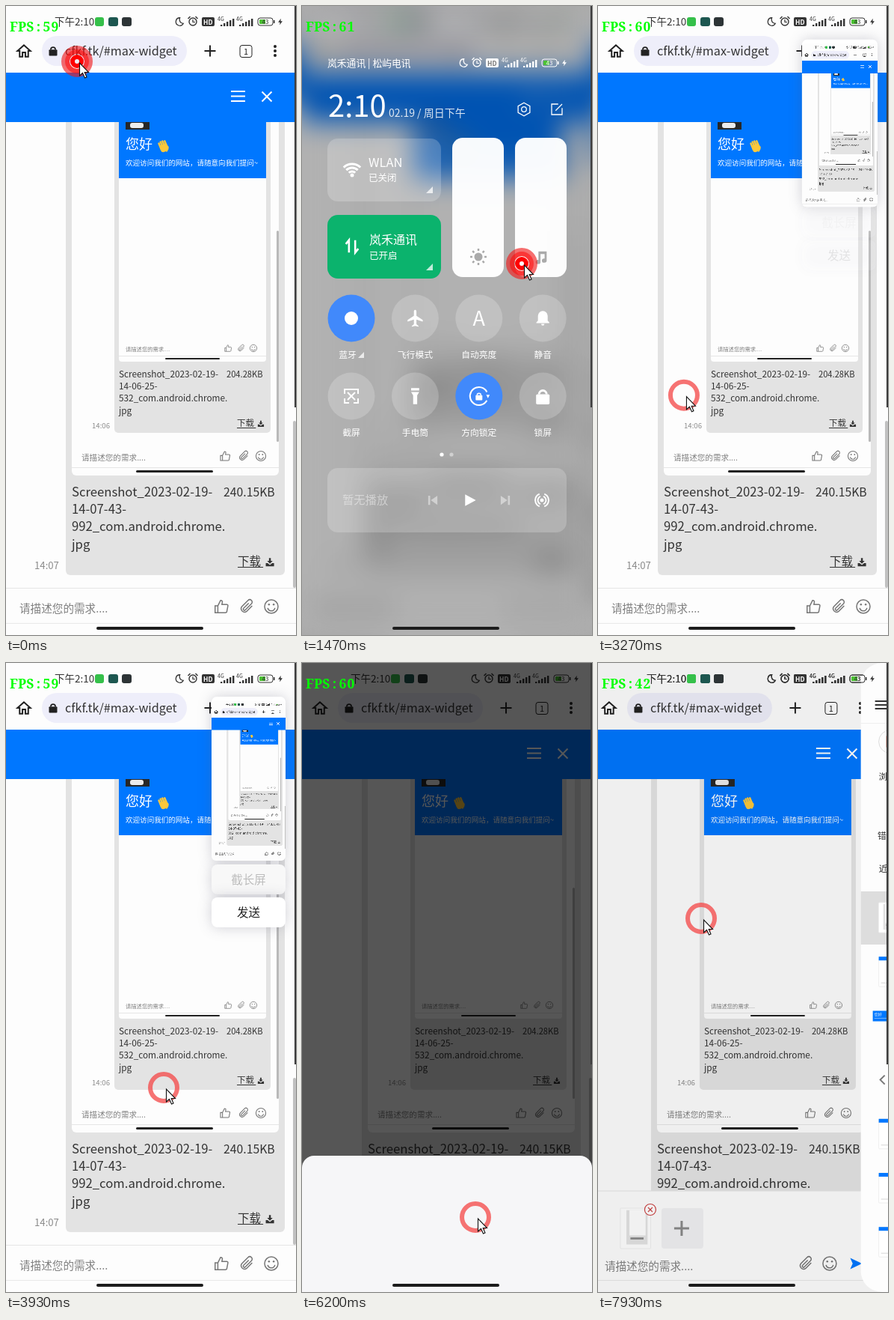
Animation of 388x840 px, one loop 8 s. Source, as an HTML page with a canvas:

```html
<!DOCTYPE html>
<html lang="zh">
<head>
<meta charset="utf-8">
<style>
html, body { margin: 0; width: 388px; height: 840px; overflow: hidden; background: #fff; }
canvas { display: block; }
</style>
</head>
<body>
<canvas id="stage" width="388" height="840"></canvas>
<script>
const W = 388, H = 840, LOOP = 8000;
const FONT = '"Noto Sans CJK SC", "Noto Sans CJK JP", Roboto, sans-serif';
const BLUE = '#0077ff', GREY = '#e3e3e3', INK = '#333';
const stage = document.getElementById('stage').getContext('2d');
let c = stage;

const PATHS = {
  home: 'M12 4L3 12H6V20H10V14H14V20H18V12H21Z',
  thumb: 'M3 11H7V21H3ZM7 11L11 3C13 3 14 4 13.5 6L13 9H20C21 9 22 10 21.7 11L20 20C19.8 20.6 19 21 18 21H7',
  clip: 'M20 11L12 19A5 5 0 0 1 5 12L14 3A3.5 3.5 0 0 1 19 8L10 17A1.7 1.7 0 0 1 7.5 14.5L15 7',
  download: 'M10 3H14V9H18L12 15L6 9H10ZM3 14H7L12 18L17 14H21V21H3Z',
  plane: 'M12 2C13 2 13.5 3 13.5 4V9L21 14V16L13.5 13.5V19L16 21V22L12 21L8 22V21L10.5 19V13.5L3 16V14L10.5 9V4C10.5 3 11 2 12 2Z',
  bell: 'M12 3A6 6 0 0 1 18 9V15L20 17V18H4V17L6 15V9A6 6 0 0 1 12 3ZM10 19H14A2 2 0 0 1 10 19Z',
  moon: 'M13 3A9 9 0 1 0 21 16A9 9 0 0 1 13 3Z',
  bolt: 'M14 2L5 14H11L10 22L19 10H13Z',
  send: 'M3 3L22 12L3 21L7 12Z',
  corner: 'M3 3H10L7.5 5.5L11 9L9 11L5.5 7.5L3 10Z',
  note: 'M8 4H20V17A3.5 3 0 1 1 17 14.5V8H11V19A3.5 3 0 1 1 8 16.5Z',
  play: 'M6 4L21 12L6 20Z',
  skip: 'M5 5L15 12L5 19ZM16 5H19V19H16Z',
  torch: 'M7 2H17V5H7ZM7 7H17L14.5 11V22H9.5V11Z',
  hexagon: 'M12 2L21 7V17L12 22L3 17V7Z',
  edit: 'M14 4H4V20H20V10M10 14L20 4',
  doc: 'M5 2H14L20 8V22H5Z',
  arrows: 'M8 20V4L4 9M16 4V20L20 15',
  pointer: 'M0 0V17L4 13.5L7 20L9.5 19L6.7 12.5H12Z'
};
for (const k in PATHS) PATHS[k] = new Path2D(PATHS[k]);

function box(x, y, w, h, r, fill, stroke) {
  c.beginPath();
  c.roundRect(x, y, w, h, r);
  if (fill) { c.fillStyle = fill; c.fill(); }
  if (stroke) { c.strokeStyle = stroke; c.lineWidth = 1; c.stroke(); }
}
function disc(x, y, r, fill) {
  c.beginPath();
  c.arc(x, y, r, 0, 7);
  c.fillStyle = fill;
  c.fill();
}
function arc(x, y, r, color, w = 1, from = 0, to = Math.PI * 2) {
  c.beginPath();
  c.arc(x, y, r, from, to);
  c.strokeStyle = color;
  c.lineWidth = w;
  c.stroke();
}
function line(color, w, ...p) {
  c.beginPath();
  for (let i = 0; i < p.length; i += 2) c.lineTo(p[i], p[i + 1]);
  c.strokeStyle = color;
  c.lineWidth = w;
  c.stroke();
}
function text(s, x, y, size, color = INK, weight = 400, align = 'left') {
  c.font = `${weight} ${size}px ${FONT}`;
  c.textAlign = align;
  c.fillStyle = color;
  c.fillText(s, x, y);
}
// Icons live on a 24-unit grid; a line width means outline instead of fill.
function icon(name, x, y, size, color, lineWidth, turn = 0) {
  c.save();
  c.translate(x, y);
  c.rotate(turn);
  c.scale(size / 24, size / 24);
  c.translate(-12, -12);
  if (lineWidth) {
    c.strokeStyle = color;
    c.lineWidth = lineWidth * 24 / size;
    c.stroke(PATHS[name]);
  } else {
    c.fillStyle = color;
    c.fill(PATHS[name]);
  }
  c.restore();
}
const menu = (x, y, w, gap, color) =>
  [-gap, 0, gap].forEach(d => line(color, 2, x, y + d, x + w, y + d));
const cross = (x, y, r, color, w) => {
  line(color, w, x - r, y - r, x + r, y + r);
  line(color, w, x - r, y + r, x + r, y - r);
};
const plus = (x, y, r, color, w) => {
  line(color, w, x - r, y, x + r, y);
  line(color, w, x, y - r, x, y + r);
};
function smile(x, y, r, color) {
  const w = Math.max(.8, r / 6);
  arc(x, y, r, color, w);
  arc(x, y + r * .1, r * .55, color, w, .2, 2.94);
  disc(x - r * .35, y - r * .3, r * .14, color);
  disc(x + r * .35, y - r * .3, r * .14, color);
}
function padlock(x, y, s, color) {
  box(x - s * .5, y - s * .25, s, s * .75, s * .1, color);
  arc(x, y - s * .25, s * .28, color, s * .16, Math.PI, 0);
}
function longShot(x, y, s) {
  box(x, y, 30 * s, 40 * s, 1, '#fff', '#eeeeee');
  box(x + 6 * s, y + 2 * s, 21 * s, 34 * s, 0, GREY);
  box(x + 9 * s, y + 2 * s, 16 * s, 25 * s, 0, '#fff');
  box(x + 10 * s, y + 29 * s, 13 * s, 2 * s, 0, '#888');
}

function statusIcons(x, y, color) {
  icon('moon', x, y, 14, color, 1.3);
  arc(x + 18, y, 5, color, 1.4);
  line(color, 1.2, x + 18, y - 3, x + 18, y + .5, x + 21, y + .5);
  line(color, 1.4, x + 11.5, y - 4, x + 14.5, y - 7);
  line(color, 1.4, x + 24.5, y - 4, x + 21.5, y - 7);
  box(x + 30, y - 6, 17, 12, 2, color);
  text('HD', x + 32, y + 3.5, 8.5, color === '#fff' ? '#777' : '#fff', 700);
  for (const sx of [x + 51, x + 76]) {
    text('4G', sx, y - 1, 7, color, 500);
    for (let i = 0; i < 5; i++) box(sx + 4 + i * 4, y + 4 - i * 2, 2.4, 2 + i * 2, 0, color);
  }
  box(x + 105, y - 5, 20, 10, 3, null, color);
  box(x + 107, y - 3, 8, 6, 1, '#4bc233');
  text('43', x + 115, y + 3, 8, color, 500, 'center');
  box(x + 126, y - 2, 1.5, 4, 0, color);
  icon('bolt', x + 135, y, 10, color);
}
function statusBar() {
  text('下午2:10', 65, 26, 13.5);
  box(119, 15, 12, 12, 3, '#35c04a');
  box(137, 15, 13, 12, 3, '#1d5750');
  box(155, 15, 13, 12, 3, '#2d3436');
  statusIcons(232, 21, INK);
}

function composer(y, scale, textX, size, iconXs) {
  text('请描述您的需求....', textX, y + size * .58, size, '#808080');
  icon('thumb', iconXs[0], y, 22 * scale, '#777', 1.5 * scale);
  icon('clip', iconXs[1], y, 22 * scale, '#777', 1.5 * scale);
  smile(iconXs[2], y, 9 * scale, '#777');
}
function fileLabel(x, y, step, size, lines, sizeX, weight) {
  lines.forEach((s, i) => text(s, x, y + i * step, size));
  text(weight, sizeX, y, size * .945);
}
function download(x, y, size) {
  text('下载', x, y, size);
  line(INK, 1, x, y + 2.5, x + size * 2.2, y + 2.5);
  icon('download', x + size * 2.78, y - size * .27, size * .95, INK);
}
function hand(x, y) {
  c.save();
  c.translate(x, y);
  c.rotate(-.4);
  box(-5, -2, 11, 10, 4, '#fcc83c');
  for (let i = 0; i < 4; i++) box(-5 + i * 2.8, -8 + Math.abs(i - 1.5), 2.5, 10, 1.2, '#fcc83c');
  c.rotate(.7);
  box(5, -2, 2.8, 8, 1.4, '#fcc83c');
  c.restore();
}

function page(attached) {
  box(-100, 0, W + 200, H, 0, '#fdfdfd');
  icon('home', 24, 60, 23, '#222', 2);
  box(48, 40, 194, 40, 20, '#eeeefa');
  padlock(63, 61, 11, '#222');
  text('cfkf.tk/#max-widget', 79, 66, 16.2, INK);
  plus(273, 60, 7.5, '#222', 2);
  box(313, 52.5, 16, 16, 3, null, '#222');
  text('1', 321, 65, 11, '#222', 500, 'center');
  [-6, 0, 6].forEach(d => disc(360, 60 + d, 2, '#222'));

  box(80, 150, 293, 610, 6, GREY);
  box(88, 150, 277, 477, 6, '#fdfdfd');
  box(145, 150, 209, 420, 5, GREY);
  box(151, 150, 197, 325, 4, '#fdfdfd');
  box(151, 150, 197, 80, 0, BLUE);
  box(160, 150, 32, 15, 0, '#272727');
  box(166, 156, 18, 7, 3, '#ececec');
  text('您好', 160, 191, 18, '#fff');
  hand(210, 187);
  text('欢迎访问我们的网站，请随意向我们提问~', 160, 213, 9.55, '#fff');
  composer(457, .52, 160, 7.3, [297, 314.5, 331]);
  line('#e6e6e6', 1, 151, 467.5, 348, 467.5);
  box(213, 470, 73, 2, 1, '#222');
  fileLabel(151, 495.5, 16.4, 11.8,
    ['Screenshot_2023-02-19-', '14-06-25-', '532_com.android.chrome.', 'jpg'], 295, '204.28KB');
  text('14:06', 115, 564, 9.6, '#8a8a8a');
  download(309, 561, 11.5);
  box(362, 300, 3, 282, 1.5, '#b9b9b9');
  composer(601, .73, 101, 10.6, [293, 318, 341]);
  line('#e6e6e6', 1, 88, 616.5, 365, 616.5);
  box(174, 620, 103, 3, 1.5, '#222');
  fileLabel(88, 655, 23.2, 16.7,
    ['Screenshot_2023-02-19-', '14-07-43-', '992_com.android.chrome.', 'jpg'], 291, '240.15KB');
  text('14:07', 38, 752, 13.2, '#8a8a8a');
  download(310, 747, 15.5);
  box(384, 554, 4, 223, 2, '#c1c1c1');

  box(-100, 89, W + 198, 66, 0, BLUE);
  menu(301, 120.5, 19, 6.5, '#fff');
  cross(349, 121, 6.5, '#fff', 2);

  if (attached) {
    box(-100, 705, W + 200, 135, 0, '#fdfdfd');
    line('#e4e4e4', 1, 0, 705, W + 100, 705);
    longShot(39, 728, 1.35);
    disc(79, 730, 8, '#fff');
    arc(79, 730, 7.5, '#c44', 1.2);
    cross(79, 730, 3, '#c44', 1.2);
    box(94, 728, 56, 54, 4, '#f0f0f2');
    plus(121, 755, 10, '#888', 3);
    text('请描述您的需求....', 18, 811, 14.6, '#808080');
    icon('clip', 287, 802, 22, '#777', 1.5);
    smile(319, 802, 9, '#777');
    icon('send', 354, 802, 20, BLUE);
  } else {
    box(0, 777, W, 63, 0, '#fdfdfd');
    line('#e6e6e6', 1, 0, 777.5, W, 777.5);
    composer(802, 1, 18, 14.6, [288, 322, 355]);
  }
  line('#e8e8e8', 1, 0, 824.5, W + 100, 824.5);
}

function controlCenter(k) {
  const away = 1 - k;
  // Each tile shrinks about its own centre while the whole panel lifts.
  const tile = (x, y, draw) => {
    c.save();
    c.translate(x, y - 22 * away);
    c.scale(1 - .1 * away, 1 - .1 * away);
    c.translate(-x, -y);
    draw();
    c.restore();
  };
  const pale = 'rgba(255,255,255,.2)', dim = 'rgba(255,255,255,.45)', white = '#fff';
  const corner = (x, y, s = 9) => {
    c.beginPath();
    c.moveTo(x, y); c.lineTo(x - s, y); c.lineTo(x, y - s);
    c.fillStyle = 'rgba(255,255,255,.75)';
    c.fill();
  };
  c.save();
  c.globalAlpha = k;
  tile(194, 76, () => {
    text('岚禾通讯 | 松屿电讯', 34, 81, 12.8, white, 500);
    statusIcons(216, 76, white);
  });
  tile(72, 131, () => text('2:10', 35, 148, 40, white, 200));
  tile(170, 142, () => text('02.19 / 周日下午', 116, 148, 14, 'rgba(255,255,255,.85)', 300));
  tile(319, 138, () => {
    icon('hexagon', 297, 138, 21, white, 1.3);
    arc(297, 138, 3.3, white, 1.3);
    icon('edit', 341, 138, 21, white, 1.3);
  });
  tile(110, 219, () => {
    box(34, 177, 152, 84, 14, pale);
    [6, 11, 16].forEach(r => arc(67, 227, r, white, 3, -2.35, -.8));
    disc(67, 226, 2.5, white);
    text('WLAN', 89, 215, 16.5, white, 500);
    text('已关闭', 89, 234, 12.5, white);
    corner(175, 250);
  });
  tile(110, 321, () => {
    box(34, 279, 152, 85, 14, '#0bb36d');
    icon('arrows', 67, 321, 25, white, 2.6);
    text('岚禾通讯', 90, 318, 16, white, 500);
    text('已开启', 90, 338, 12.5, white);
    corner(175, 353);
  });
  [235.5, 319.5].forEach((x, i) => tile(x, 269, () => {
    box(x - 34.5, 176, 69, 186, 14, 'rgba(255,255,255,.97)');
    if (i) return icon('note', 320, 335, 22, '#aaa');
    disc(236, 335, 5.5, '#aaa');
    for (let a = 0; a < 6.2; a += Math.PI / 4)
      line('#aaa', 2.5, 236 + 8 * Math.cos(a), 335 + 8 * Math.sin(a), 236 + 11 * Math.cos(a), 335 + 11 * Math.sin(a));
  }));
  ['蓝牙', '飞行模式', '自动亮度', '静音', '截屏', '手电筒', '方向锁定', '锁屏'].forEach((label, i) => {
    const x = 66 + (i % 4) * 85.4, y = i < 4 ? 417 : 521;
    tile(x, y, () => {
      disc(x, y, 31.5, i === 0 || i === 6 ? '#4189fb' : pale);
      text(label, i ? x : x - 5, y + 53, 11.8, white, 400, 'center');
      [
        () => { disc(x, y, 9, white); corner(x + 17, y + 53, 8); },
        () => icon('plane', x, y, 27, white),
        () => text('A', x, y + 10, 27, white, 400, 'center'),
        () => icon('bell', x, y, 26, white),
        () => {
          [[-1, -1], [1, -1], [-1, 1], [1, 1]].forEach(([u, v]) =>
            line(white, 2, x + u * 9, y + v * 3, x + u * 9, y + v * 9, x + u * 3, y + v * 9));
          line(white, 2, x - 9, y - 9, x + 9, y - 9);
          cross(x, y, 5, white, 2);
        },
        () => icon('torch', x, y, 26, white),
        () => { arc(x, y, 12, white, 2, .5, 5.8); padlock(x, y + 1, 9, white); icon('play', x + 12, y, 7, white, 0, 1.57); },
        () => padlock(x, y + 2, 18, white)
      ][i]();
    });
  });
  disc(187, 599, 2.6, white);
  disc(200, 599, 2.6, dim);
  tile(194, 660, () => {
    box(34, 617, 320, 86, 14, pale);
    text('暂无播放', 54, 665, 15.3, dim);
    icon('skip', 175, 660, 21, dim, 0, Math.PI);
    icon('play', 224, 660, 23, white);
    icon('skip', 272, 660, 21, dim);
    disc(321, 660, 2.5, white);
    for (const r of [5.5, 9]) {
      arc(321, 660, r, white, 2, -1.2, 1.2);
      arc(321, 660, r, white, 2, 1.94, 4.34);
    }
  });
  c.restore();
}

const FILES = [
  ['Screenshot_2023-02-19-14-1...', '下午2:10, 267 kB, JPG 图片'],
  ['Screenshot_2023-02-19-14-0...', '下午2:07, 246 kB, JPG 图片'],
  ['Screenshot_2023-02-19-14-0...', '下午2:06, 209 kB, JPG 图片'],
  ['index.html', '上午5:36, 12.70 kB, HTML 文档'],
  ['e4d977cc-e0f1-4b85-870a-5...', '上午5:18, 2.79 MB, GIF 图片'],
  ['20230219_051513.gif', '上午5:15, 26.67 MB, GIF 图片'],
  ['Video_20230219_051137_606...', '上午5:12, 16.77 MB, GIF 图片']
];
function picker(selected) {
  const dark = '#555';
  box(0, 0, W, H, 28, '#fdfdfd');
  if (selected) box(0, 305, W, 71, 0, '#dddddd');
  c.translate(-2, 0);
  menu(21, 56, 17, 5, INK);
  text('最近', 74, 63, 19, '#222', 500);
  arc(316, 54, 6, dark, 2.2);
  line(dark, 2.4, 320, 58, 327, 65);
  [-6, 0, 6].forEach(d => disc(364, 56 + d, 2, dark));
  line('#efefef', 1, 0, 80.5, W, 80.5);

  ['图片', '音频', '视频', '文档', ''].forEach((s, i) => {
    const x = 26 + i * 86.5;
    box(x, 89.5, 78.5, 31, 15.5, null, '#dcdcdc');
    text(s, x + 39, 109.5, 13.8, INK, 500);
    if (i > 2) return icon('doc', x + 19, 105, 20, '#666');
    box(x + 10, 96, 18, 18, 2, '#e8503a');
    if (i === 0) line('#fff', 2.5, 39, 110, 42.5, 105.5, 45, 108.5, 48, 104.5, 51, 110, 39, 110);
    if (i === 1) { arc(x + 19, 105, 5, '#fff', 2, Math.PI, 0); box(x + 13, 105, 4, 6, 1, '#fff'); box(x + 21, 105, 4, 6, 1, '#fff'); }
    if (i === 2) [12, 18, 24].forEach(d => line('#fff', 1.6, x + d, 96, x + d + 3, 101));
  });

  text('浏览其他应用中的文件', 26, 156, 10.9, '#222', 500);
  ['错误报告', '本地视频', '录音机', '系统跟踪记录'].forEach((s, i) =>
    text(s, 48 + i * 93, 235, 11.8, INK, 400, 'center'));
  box(42, 189, 12, 19, 6, null, dark);
  box(43, 190, 10, 17, 5, null, dark);
  [192, 198, 204].forEach(y => { line(dark, 2, 37, y, 42, y); line(dark, 2, 54, y, 59, y); });
  [196, 201].forEach(y => line(dark, 2, 45, y, 51, y));
  line(dark, 2, 43, 186, 46, 190); line(dark, 2, 53, 186, 50, 190);
  box(127, 183, 29, 29, 6, '#24a3ea');
  disc(234, 198, 11, '#e85545');
  disc(327, 198, 9, '#a4c52c');

  text('近期的文件', 26, 279, 11.7, '#222', 500);
  for (let i = 0; i < 6; i++) box(335.5 + (i % 3) * 5.3, i < 3 ? 269.5 : 275, 5, 5, 0, null, dark);

  FILES.forEach(([name, info], i) => {
    const y = 340 + i * 72.2;
    text(name, 73, y - 4, 16, '#2b2b2b');
    text(info, 73, y + 17, 11.5, '#707070');
    line('#dedede', 1, 73, y + 36.5, 382, y + 36.5);
    for (let q = 0; q < 4; q++) icon('corner', 354, y, 29, '#444', 0, q * Math.PI / 2);
    if (i === 0) longShot(26, y - 20, 1);
    else if (i === 2) {
      box(18, y - 20, 39, 14, 0, BLUE);
      text('您好', 20, y - 13, 5, '#fff');
      line('#9cc9ff', .8, 20, y - 10, 45, y - 10);
    } else if (i === 3) {
      line('#777', 2, 34, y - 6, 28, y, 34, y + 6);
      line('#777', 2, 40, y - 6, 46, y, 40, y + 6);
    } else {
      box(26, y - 20, 30, 40, 1, '#fff', '#eeeeee');
      box(26, y - 20, 30, 5, 0, BLUE);
      line('#d5d5d5', 1, 29, y + 15, 53, y + 15);
    }
  });
  text('mmexport1676733696326.png', 73, 842, 16, '#d5d5d5');
}

// Piecewise interpolation over [time, value...] rows.
function track(rows, t, smooth) {
  if (t <= rows[0][0]) return rows[0].slice(1);
  for (let i = 1; i < rows.length; i++) {
    const a = rows[i - 1], b = rows[i];
    if (t < b[0]) {
      let u = (t - a[0]) / (b[0] - a[0]);
      if (smooth) u = u * u * (3 - 2 * u);
      return a.slice(1).map((v, j) => v + (b[j + 1] - v) * u);
    }
  }
  return rows[rows.length - 1].slice(1);
}
const easeOut = u => 1 - (1 - Math.min(1, Math.max(0, u))) ** 3;

const CURSOR = [
  [60, 95, 74], [330, 254, 139], [470, 254, 139], [850, 267, 11], [1070, 267, 11], [1420, 294, 344],
  [1700, 294, 344], [2250, 70, 504], [2800, 70, 504], [3500, 130, 525], [3930, 211, 567],
  [4700, 324, 802], [5300, 324, 802], [5900, 232, 740], [6250, 232, 740], [6850, 135, 222],
  [7130, 135, 222], [7330, 138, 341]
];
const PRESSES = [[0, 65], [870, 1620], [2300, 2690], [4750, 5060], [6000, 6200], [7350, 7520]];
const FPS = [59, 61, 60, 60, 59, 60, 60, 59, 42];

function pointer(t) {
  const [x, y] = track(CURSOR, t, true);
  if (PRESSES.some(([a, b]) => t >= a && t < b)) {
    // The gap and the centre stay open, so the screen shows through.
    arc(x, y, 15.5, 'rgba(240,25,25,.62)', 11);
    arc(x, y, 13, 'rgba(255,0,0,.5)', 6);
    arc(x, y, 6, '#ff0000', 6);
  } else {
    arc(x, y, 18, 'rgba(245,70,70,.75)', 6);
  }
  c.save();
  c.translate(x + 3.5, y + 2);
  c.fillStyle = '#fff';
  c.strokeStyle = '#111';
  c.lineWidth = 1.1;
  c.fill(PATHS.pointer);
  c.stroke(PATHS.pointer);
  c.restore();
}

function fpsCounter(t) {
  c.font = 'bold 17.5px "Noto Serif", serif';
  c.textAlign = 'center';
  c.fillStyle = '#00ff00';
  const label = 'FPS:' + FPS[Math.floor((t + 300) / 1000)];
  [...label].forEach((ch, i) => c.fillText(ch, 10.5 + i * 11, 34));
}

function screenshotCard(t) {
  const k = easeOut((t - 2950) / 400), slide = 130 * easeOut((t - 4250) / 300);
  const mix = (a, b) => a + (b - a) * k;
  const x = mix(0, 275) + slide, y = mix(0, 50), w = mix(W, 99), h = mix(H, 214);
  const [buttons] = track([[3250, 0], [3450, 1]], t);
  c.save();
  c.shadowColor = 'rgba(90,90,110,.28)';
  c.shadowBlur = 18;
  box(x, y - 5 * k, w, h + 5 * k, 7, '#fff');
  c.globalAlpha = buttons;
  box(x, 269, 99, 40, 8, '#f8f8f8');
  box(x, 313, 99, 40, 8, '#fff');
  c.shadowColor = 'transparent';
  text('截长屏', x + 49.5, 295, 15.5, '#bdbdbd', 400, 'center');
  text('发送', x + 49.5, 339, 15.5, '#222', 500, 'center');
  c.globalAlpha = 1;
  box(x, y, w, h, 6);
  c.clip();
  c.drawImage(shot, x, y, w, h);
  c.restore();
}

function blurredBackdrop(k) {
  c.filter = `blur(${18 * k}px)`;
  // An oversized copy keeps the stage edges opaque.
  c.drawImage(shot, -50, -50, W + 100, H + 100);
  c.drawImage(shot, 0, 0);
  c.filter = 'none';
  box(0, 0, W, H, 0, `rgba(0,0,0,${.3 * k})`);
}

function blackCorners() {
  c.beginPath();
  c.rect(0, 0, W, H);
  c.roundRect(0, 0, 387, H, 30);
  c.fillStyle = '#000';
  c.fill('evenodd');
}

function render(t) {
  const entering = easeOut((t - 6433) / 600), leaving = easeOut((t - 7669) / 480);
  const cover = entering - leaving;
  c.save();
  c.translate(-cover * W / 4, 0);
  page(t > 7500);
  c.restore();
  statusBar();

  const [blur] = track([[1070, 0], [1400, 1], [2450, 1], [2600, .62], [2740, 0]], t);
  if (blur > 0) {
    blurredBackdrop(blur);
    const [panel] = track([[1130, 0], [1430, 1], [2400, 1], [2600, .08], [2660, 0]], t);
    if (panel > 0) controlCenter(panel);
  }
  if (t > 2950 && t < 4550) screenshotCard(t);

  const [dim] = track([[4830, 0], [4930, .66], [6400, .66], [6900, 0]], t);
  const shade = Math.max(dim, cover * .6);
  if (shade > 0) box(0, 0, W, H, 0, `rgba(0,0,0,${shade})`);
  if (t > 5050 && t < 7100) box(0, track([[5050, H], [5250, 658]], t, true)[0], W, 200, [16, 16, 0, 0], '#f6f6f8');
  if (cover > 0) {
    c.save();
    c.translate(W * (1 - cover), 0);
    picker(t > 7350);
    c.restore();
    if (entering < 1) blackCorners();
    statusBar();
  }

  box(386, 0, 2, 536, 0, '#3c3c3c');
  box(121, 829, 143, 4, 2, '#1c1c1c');
  pointer(t);
  fpsCounter(t);
}

const shot = document.createElement('canvas');
shot.width = W;
shot.height = H;
c = shot.getContext('2d');
page(false);
statusBar();
c = stage;

function frame(now) {
  render(now % LOOP);
  requestAnimationFrame(frame);
}
requestAnimationFrame(frame);
</script>
</body>
</html>
```
